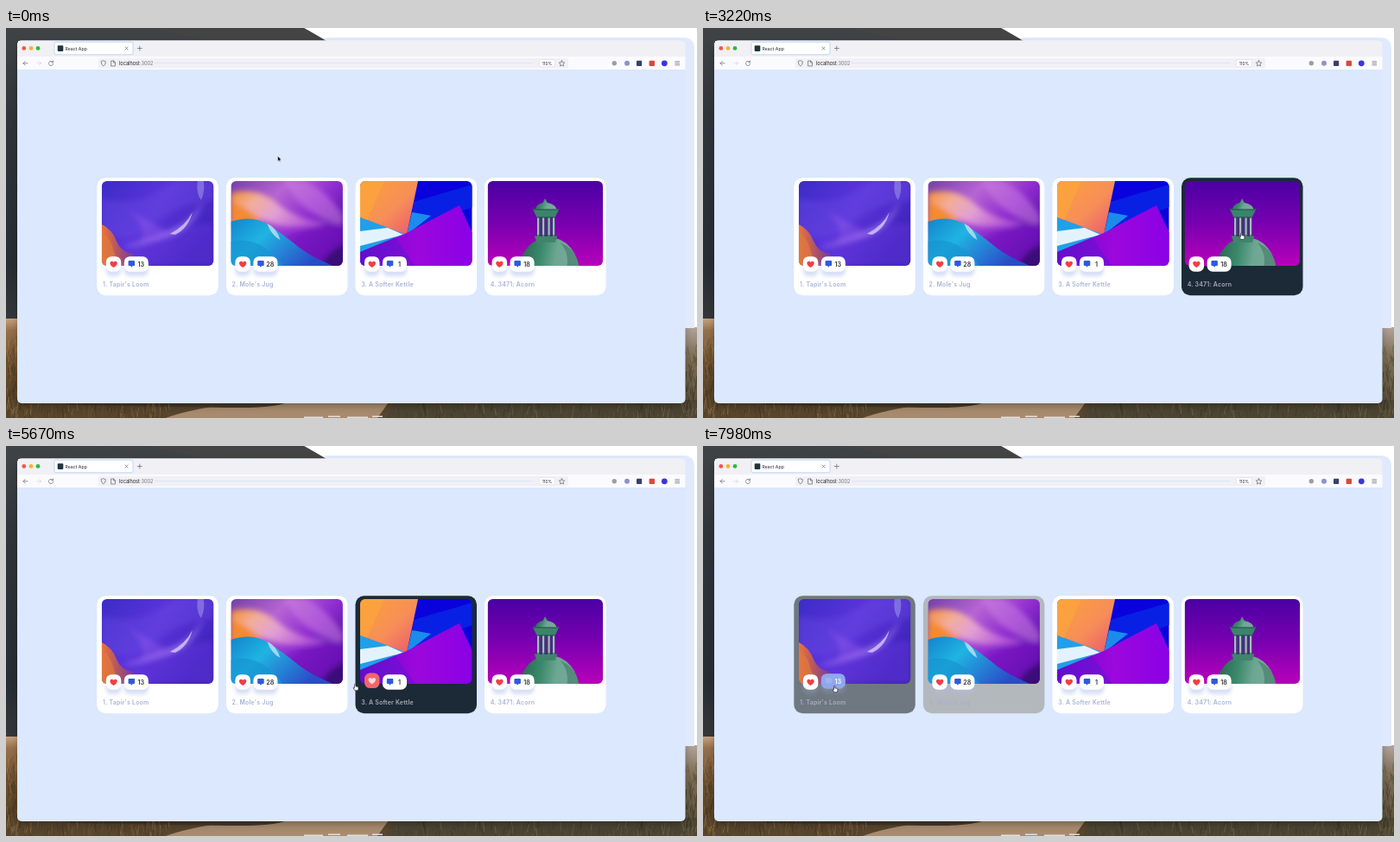
These frames come from a looping animation (800 by 451 pixels, 8000 ms). An HTML page:

```html
<!DOCTYPE html>
<html lang="en">
<head>
<meta charset="utf-8">
<title>Card hover</title>
<style>
  html, body { margin: 0; width: 100%; height: 100%; overflow: hidden; background: #fff; }
  svg { display: block; width: 100%; height: 100%; }
  text { font-family: Inter, sans-serif; }
  .line { fill: none; stroke: #62636c; stroke-width: .7; stroke-linecap: round; stroke-linejoin: round; }
</style>
</head>
<body>
<svg id="stage" viewBox="0 0 800 451">
  <defs>
    <filter id="soft" x="-30%" y="-60%" width="160%" height="220%"><feGaussianBlur stdDeviation="2.2"/></filter>
    <filter id="shade" x="-5%" y="-5%" width="110%" height="110%"><feGaussianBlur stdDeviation="4"/></filter>
    <filter id="blend" x="-20%" y="-20%" width="140%" height="140%"><feGaussianBlur stdDeviation="3"/></filter>
    <clipPath id="photo"><rect width="129.5" height="98" rx="6"/></clipPath>
    <clipPath id="widePhoto"><rect width="133.5" height="98" rx="6"/></clipPath>
    <linearGradient id="rock" x2="0" y2="1">
      <stop stop-color="#404346"/><stop offset=".3" stop-color="#30353b"/>
      <stop offset=".8" stop-color="#272d35"/><stop offset="1" stop-color="#36383a"/>
    </linearGradient>
    <linearGradient id="field" x2="0" y2="1">
      <stop stop-color="#c6a27e"/><stop offset=".12" stop-color="#96704b"/>
      <stop offset=".5" stop-color="#674c2c"/><stop offset="1" stop-color="#4f3d26"/>
    </linearGradient>
    <linearGradient id="meadow" x2="0" y2="1">
      <stop stop-color="#b3a39a"/><stop offset=".3" stop-color="#80705a"/><stop offset="1" stop-color="#4b4231"/>
    </linearGradient>
    <linearGradient id="violet" x2="1" y2=".6">
      <stop stop-color="#3c2cc6"/><stop offset=".5" stop-color="#5c34dc"/><stop offset="1" stop-color="#3c22b8"/>
    </linearGradient>
    <linearGradient id="ember" x2="1" y2="0">
      <stop stop-color="#e9743c"/><stop offset=".5" stop-color="#a9506a"/><stop offset="1" stop-color="#5a34b8"/>
    </linearGradient>
    <linearGradient id="dusk" x2="1" y2=".7">
      <stop stop-color="#7440a8"/><stop offset=".35" stop-color="#b764d4"/>
      <stop offset=".65" stop-color="#8f2cd0"/><stop offset="1" stop-color="#430c94"/>
    </linearGradient>
    <linearGradient id="peach" x2="1" y2=".4">
      <stop stop-color="#f58d2c"/><stop offset=".3" stop-color="#f2ae9c"/>
      <stop offset=".6" stop-color="#e2a0d4"/><stop offset="1" stop-color="#b455d8"/>
    </linearGradient>
    <linearGradient id="sea" x2="1" y2=".5">
      <stop stop-color="#1383cc"/><stop offset=".4" stop-color="#20b4e2"/><stop offset="1" stop-color="#2a4cc8"/>
    </linearGradient>
    <linearGradient id="coral" x2="1" y2="1">
      <stop stop-color="#fba03a"/><stop offset=".55" stop-color="#f78e58"/><stop offset="1" stop-color="#e85470"/>
    </linearGradient>
    <linearGradient id="purple" x2="1" y2="0">
      <stop stop-color="#6a08cc"/><stop offset=".5" stop-color="#9c08dc"/><stop offset="1" stop-color="#8a00e6"/>
    </linearGradient>
    <linearGradient id="night" x2="0" y2="1">
      <stop stop-color="#4b00a4"/><stop offset=".5" stop-color="#7800b0"/><stop offset="1" stop-color="#b800ba"/>
    </linearGradient>
    <linearGradient id="copper" x2="1" y2=".2">
      <stop stop-color="#24604b"/><stop offset=".4" stop-color="#3c8a6c"/>
      <stop offset=".65" stop-color="#6ca793"/><stop offset="1" stop-color="#7ea69c"/>
    </linearGradient>
  </defs>

  <!-- landscape -->
  <rect width="800" height="451" fill="#fff"/>
  <path d="M362 14Q367 11 376 11H785Q797 11 797 25V348H780V14Z" fill="#e0eafc"/>
  <path d="M0 0H345Q356 6 371 15H14V340H0Z" fill="url(#rock)"/>
  <path d="M170 0H345L371 15H230Z" fill="#4a463f" opacity=".4"/>
  <rect y="336" width="20" height="115" fill="url(#field)"/>
  <rect x="780" y="346" width="20" height="105" fill="url(#meadow)"/>
  <rect y="430" width="800" height="21" fill="#57452d"/>
  <path d="M185 451Q220 438 300 430H445L430 451Z" fill="#a88b6e"/>
  <path d="M70 430H330Q320 440 260 439T70 436Z" fill="#46382a"/>
  <path d="M440 451L450 430H800V451Z" fill="#4c4433"/>
  <path d="M345 450.300h22m6 -1h14m8 1h24m5 -1h12" stroke="#e6dfda" stroke-width="1.500"/>
  <g id="grass" fill="none" stroke-width=".9"></g>

  <!-- browser window -->
  <rect x="14" y="20" width="772" height="417" rx="6" fill="#000" opacity=".3" filter="url(#shade)"/>
  <path d="M786 22V347H797V28Q797 13 785 12Z" fill="#e0eafc"/>
  <rect x="13" y="14.600" width="773.500" height="419.400" rx="5" fill="#dbe8fd"/>
  <path d="M13 33V19.600Q13 14.600 18 14.600H781.500Q786.500 14.600 786.500 19.600V33Z" fill="#f0f0f5"/>
  <rect x="13" y="33" width="773.500" height="15" fill="#fbfbfe"/>
  <circle cx="20.8" cy="23.4" r="2.4" fill="#f4544d"/>
  <circle cx="29" cy="23.4" r="2.4" fill="#f6b32e"/>
  <circle cx="37" cy="23.4" r="2.4" fill="#2fb845"/>
  <rect x="56" y="16.2" width="91" height="14.6" rx="2" fill="#fff" stroke="#b3cff5" stroke-width=".8"/>
  <rect x="59.7" y="20.3" width="6.6" height="6.6" rx=".8" fill="#20343c"/>
  <text x="68.5" y="25.6" font-size="5.2" fill="#25252d">React App</text>
  <path class="line" d="M138 22l3 3m0 -3l-3 3M152.3 23.5h5m-2.500 -2.500v5"/>
  <rect x="107" y="35" width="544" height="11.500" rx="2" fill="#f0f0f5"/>
  <path d="M172 40.500H610" stroke="#d6e4f9" stroke-width=".8"/>
  <path class="line" d="M25 40.800h-5m2.300 -2.300l-2.300 2.300l2.300 2.300"/>
  <path class="line" d="M35.500 40.800h5m-2.300 -2.300l2.300 2.300l-2.300 2.300" opacity=".25"/>
  <path class="line" d="M54 39.200a2.600 2.600 0 1 0 .6 2.300M54.500 38v1.800h-1.800"/>
  <path class="line" d="M112.800 37.800l2.600 1q0 4 -2.600 5.200q-2.600 -1.200 -2.600 -5.200ZM122 38h2.700l1.700 1.700v4.300h-4.400ZM124.500 38v2h2"/>
  <text x="131" y="42.800" font-size="5.600" fill="#22222a">localhost<tspan fill="#74747c">:3002</tspan></text>
  <rect x="617.500" y="36.700" width="18" height="8" rx="1.500" fill="#fff" stroke="#d6d6de" stroke-width=".5"/>
  <text x="626.500" y="42.500" font-size="4.800" fill="#25252d" text-anchor="middle">110%</text>
  <path class="line" d="M643.500 37.700l1 2.100l2.300 .3l-1.700 1.600l.4 2.300l-2 -1.100l-2 1.100l.4 -2.300l-1.700 -1.600l2.300 -.3Z"/>
  <circle cx="704.300" cy="40.800" r="2.700" fill="#9c9da5"/>
  <circle cx="719" cy="40.800" r="3" fill="#8c93cc"/>
  <rect x="730" y="37.700" width="6.200" height="6.200" rx="1" fill="#39406c"/>
  <rect x="744.600" y="37.700" width="6.400" height="6.400" rx="1" fill="#d84a3c"/>
  <circle cx="762.300" cy="40.800" r="3.400" fill="#3b34dc"/>
  <path class="line" d="M774.800 38.800h4.800m-4.800 2h4.800m-4.800 2h4.800"/>

  <g id="cards"></g>
  <g id="cursor">
    <path id="arrow" d="M-1.500 -4V2.200L0 .9L1 3.100L2 2.600L1.100 .5L3 .4Z" fill="#111" stroke="#fff" stroke-width=".5"/>
    <path id="hand" d="M-1.400 -3.500Q-.6 -4.300 0 -3.400V-.9Q1.700 -1.100 3 0V1.700Q2.800 3.200 2 3.800H-1Q-2.300 2 -3 .6Q-2.600 -.2 -1.400 .8Z"
          fill="#fff" stroke="#25232c" stroke-width=".7"/>
  </g>
</svg>

<script>
const DURATION = 8000, STEP = 70;
const $ = id => document.getElementById(id);

const art = [
  `<rect width="130" height="98" fill="url(#violet)"/>
   <g filter="url(#blend)">
     <path d="M0 20Q40 30 65 12T130 0V22Q90 25 60 50T0 58Z" fill="#6a4ce2" opacity=".4"/>
     <path d="M20 98Q55 55 130 48V98Z" fill="#6c36e0" opacity=".4"/>
     <path d="M26 76Q55 66 80 56T118 22Q108 56 70 67T26 76Z" fill="#a67cf2" opacity=".7"/>
     <path d="M32 34Q55 48 82 60Q67 70 38 74Q60 60 32 34Z" fill="#9058ea" opacity=".5"/>
   </g>
   <path d="M79 61Q97 52 105 36Q100 55 85 62Z" fill="#d9c8fb" opacity=".8"/>
   <path d="M111 0Q109 14 115 22Q120 12 118 0Z" fill="#9890ea" opacity=".6"/>
   <path d="M0 50Q12 56 17 69T36 84Q41 90 43 98H0Z" fill="url(#ember)"/>
   <path d="M0 60Q9 64 13 78T23 98H0Z" fill="#e27a3c" opacity=".7"/>`,
  `<rect width="130" height="98" fill="url(#dusk)"/>
   <g filter="url(#blend)">
     <path d="M20 0H62Q80 38 130 52V40Q108 8 85 0Z" fill="#cf84e4" opacity=".5"/>
     <path d="M0 14Q30 6 54 26T112 48Q72 60 40 46T0 48Z" fill="url(#peach)"/>
     <path d="M0 24Q18 30 36 46L0 52Z" fill="#f58a2e"/>
     <path d="M62 70Q85 50 130 48V98H100Z" fill="#7a14c4" opacity=".7"/>
     <path d="M104 98Q114 78 134 72V104Z" fill="#3a0878"/>
   </g>
   <path d="M0 47Q26 38 46 52T78 76T118 98H0Z" fill="url(#sea)"/>
   <path d="M0 70Q34 62 60 98H0Z" fill="#1696d2" opacity=".7"/>
   <path d="M42 49Q53 54 57 68Q46 62 42 49Z" fill="#d5ecfa" opacity=".7"/>`,
  `<rect width="130" height="98" fill="#0a02dc"/>
   <path d="M62 24L130 4V30L58 58Z" fill="#0820e4"/>
   <path d="M60 36L82 40L54 62Z" fill="#1b8cec"/>
   <path d="M0 42L54 61L24 73L0 84Z" fill="#1fa0ea"/>
   <path d="M0 58L32 54L50 62L0 75Z" fill="#e3f3fd"/>
   <path d="M0 0H67L54 62L0 42Z" fill="url(#coral)"/>
   <path d="M0 0H28L8 45L0 42Z" fill="#fca63c" opacity=".7"/>
   <path d="M0 82L54 60L115 28L130 60V98H0Z" fill="url(#purple)"/>
   <path d="M0 82L40 65L64 98H0Z" fill="#5a18cc" opacity=".45"/>`,
  `<rect width="134" height="98" fill="url(#night)"/>
   <ellipse cx="71" cy="105" rx="35" ry="40" fill="url(#copper)"/>
   <path d="M84 71Q104 80 106 98H92Q94 82 84 71Z" fill="#2c6a56" opacity=".45"/>
   <path d="M54 63H81L78 71H57Z" fill="#41836d"/>
   <path d="M57 41H78V64H57Z" fill="#48307c"/>
   <path d="M58.500 41V64M64.500 41V64M71 41V64M76.500 41V64" stroke="#9fbfba" stroke-width="2.200"/>
   <path d="M52 32H83L78 42H57Z" fill="#3b846c"/>
   <path d="M55 33Q56 27 64 25L66.500 20L69 25Q79 27 80 33Z" fill="url(#copper)"/>
   <path d="M52 33H83M57 42H78M54 63H81" stroke="#1d4f42" stroke-width="1.200"/>`
];

const button = (x, w, content) => `<g class="button">
  <rect class="glow" x="${x}" y="271" width="${w}" height="16" rx="6" fill="#aebfee" filter="url(#soft)"/>
  <rect class="face" x="${x}" y="264.200" width="${w}" height="17.500" rx="6.500"/>${content}</g>`;

const cards = [
  ["1. Tapir's Loom", 13, 105.3, 5.5],
  ["2. Mole's Jug", 28, 254.9, 5.5],
  ["3. A Softer Kettle", 1, 404.5, 5.5],
  ["4. 3471: Acorn", 18, 554, 3.6]
].map(([title, count, x, inset], i) => {
  const left = x + inset, heartX = left + 5, chatX = left + 26;
  const root = document.createElementNS("http://www.w3.org/2000/svg", "g");
  root.innerHTML = `
    <rect class="back" x="${x}" y="173.300" width="140.500" height="136" rx="10"/>
    <g transform="translate(${left} 177)" clip-path="url(#${i === 3 ? "widePhoto" : "photo"})">${art[i]}</g>
    <text class="title" x="${x + 6.7}" y="298.700" font-size="7" font-weight="600" letter-spacing=".2">${title}</text>
    ${button(heartX, 17.5, `<path class="icon" transform="translate(${heartX + 8.8} 273)"
      d="M0 4C-6 .5 -4.500 -3.500 -2 -3.300Q-.6 -3.200 0 -2Q.6 -3.200 2 -3.300C4.500 -3.500 6 .5 0 4Z"/>`)}
    ${button(chatX, 28, `<path class="icon" transform="translate(${chatX + 4.8} 269)"
      d="M1 0H6.500Q7.500 0 7.500 1V5Q7.500 6 6.500 6H5L3.700 7.700L2.500 6H1Q0 6 0 5V1Q0 0 1 0Z"/>
      <text class="count" x="${chatX + 19.5}" y="275.600" font-size="7.200" font-weight="600" text-anchor="middle">${count}</text>`)}`;
  $("cards").append(root);
  const find = name => root.querySelector("." + name);
  const buttons = [...root.querySelectorAll(".button")].map((node, k) => ({
    node, hot: k ? "#2f5ade" : "#ef3f46",
    box: k ? [chatX, 262, 28, 21] : [heartX, 262, 17.5, 21]
  }));
  return { back: find("back"), title: find("title"), buttons, box: [x, 173.3, 140.5, 136] };
});

// Grass blades along the visible edges of the landscape
let seed = 7;
const random = () => (seed = seed * 16807 % 2147483647) / 2147483647;
function blades(count, x, y, w, h, colors) {
  let out = "";
  for (let i = 0; i < count; i++) {
    const bx = x + random() * w, by = y + random() * h;
    out += `<path d="M${bx} ${by}q${random() * 2 - 1} -5 ${random() * 6 - 3} ${-6 - random() * 9}"
      stroke="${colors[i % colors.length]}" opacity="${.2 + random() * .4}"/>`;
  }
  return out;
}
const dry = ["#b08850", "#35281a", "#80633c", "#4a3820"];
const olive = ["#8d7a55", "#2b271c", "#655a40", "#3b3424"];
$("grass").innerHTML = blades(75, 0, 365, 14, 88, dry) + blades(130, 0, 440, 190, 18, dry)
  + blades(150, 445, 441, 355, 18, olive) + blades(65, 786, 375, 14, 78, olive);

// Pointer positions: time, x, y
const path = [
  [0, 316, 152], [350, 316, 152], [800, 205, 228], [1260, 212, 236], [1650, 222, 238],
  [1900, 235, 240], [2240, 368, 240], [2290, 420, 240], [2450, 478, 240], [2800, 605, 238],
  [3400, 632, 242], [3850, 571, 276], [4340, 569, 279], [4650, 572, 279], [5050, 452, 276],
  [5350, 426, 277], [5630, 420, 279], [5670, 405, 279], [5950, 303, 280], [6370, 299, 281],
  [6800, 280, 280], [7760, 276, 280], [7903, 164, 281], [8000, 150, 281]
];
function pointer(t) {
  const time = Math.max(0, t);
  const i = path.findIndex(key => key[0] > time);
  const [t0, x0, y0] = path[i - 1], [t1, x1, y1] = path[i];
  const p = (time - t0) / (t1 - t0);
  return [x0 + (x1 - x0) * p, y0 + (y1 - y0) * p];
}
const inside = ([x, y, w, h], t) => {
  const [px, py] = pointer(t);
  return px >= x && px <= x + w && py >= y && py <= y + h;
};

// Hover amount from 0 to 1, replayed over the recent pointer path
function hover(box, t, length) {
  let v = inside(box, t - 600) ? 1 : 0;
  for (let s = t - 590; s <= t; s += 10)
    v = Math.min(1, Math.max(0, v + (inside(box, s) ? 10 : -10) / length));
  return v;
}
const channels = hex => [1, 3, 5].map(i => parseInt(hex.slice(i, i + 2), 16));
function mix(from, to, p) {
  const end = channels(to);
  return `rgb(${channels(from).map((c, i) => Math.round(c + (end[i] - c) * p))})`;
}

function draw(t) {
  for (const { back, title, buttons, box } of cards) {
    const active = hover(box, t, 300);
    back.setAttribute("fill", mix("#ffffff", "#1c2a38", active));
    title.setAttribute("fill", mix("#a6b3d6", "#a7acb4", active));
    for (const { node, hot, box } of buttons) {
      const p = hover(box, t, 150);
      const paint = (name, from, to, amount = p) =>
        node.querySelector(name)?.setAttribute("fill", mix(from, to, amount));
      node.setAttribute("transform", `translate(0 ${-2 * p})`);
      node.querySelector(".glow").setAttribute("opacity", .5 * (1 - active));
      paint(".face", "#ffffff", hot);
      paint(".icon", hot, "#ffffff");
      paint(".count", "#30323a", "#ffffff", Math.min(1, p * 2));
    }
  }
  const over = cards.some(card => inside(card.box, t));
  $("hand").setAttribute("visibility", over ? "visible" : "hidden");
  $("arrow").setAttribute("visibility", over ? "hidden" : "visible");
  $("cursor").setAttribute("transform", `translate(${pointer(t)})`);
}

const start = performance.now();
function tick() {
  const t = (performance.now() - start) % DURATION;
  draw(Math.floor(t / STEP) * STEP);
  requestAnimationFrame(tick);
}
tick();
</script>
</body>
</html>
```
